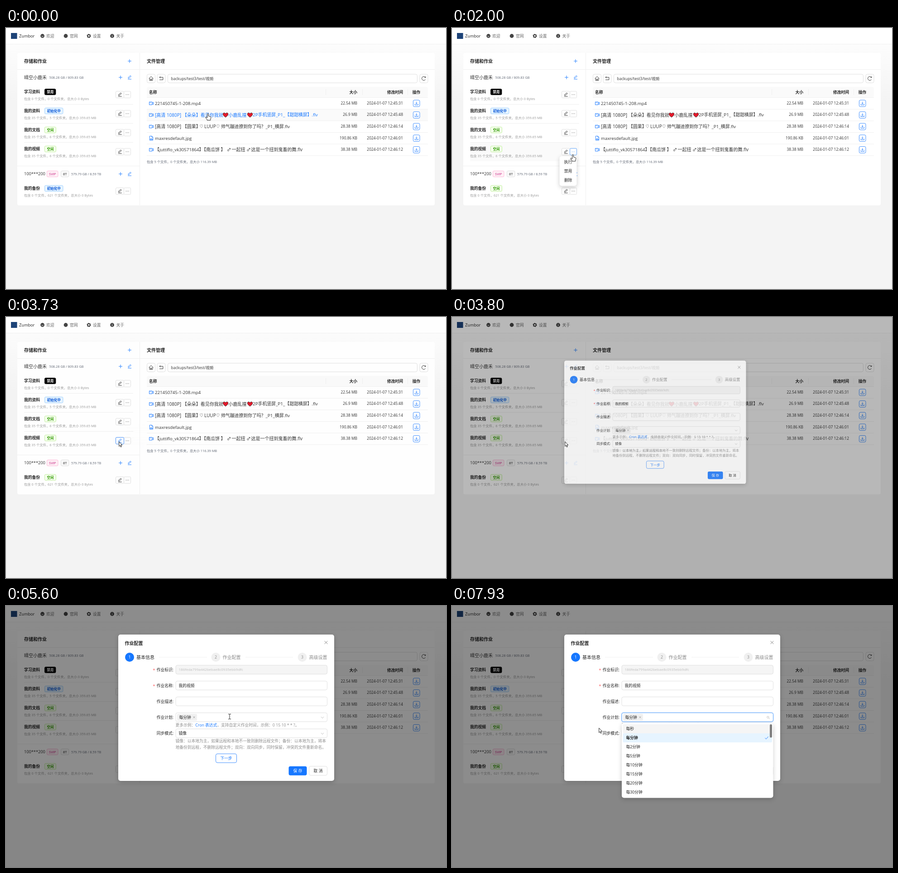
An HTML page for the animation above (8 s loop, 972x576 px).

```html
<!DOCTYPE html>
<html lang="zh-CN">
<head>
<meta charset="utf-8">
<style>
html, body { margin: 0; width: 100%; height: 100%; overflow: hidden; background: #f5f5f5; }
svg { display: block; }
text { font-family: 'Open Sans', 'Noto Sans CJK SC', 'Noto Sans CJK', 'Noto Sans', sans-serif; white-space: pre; }
.pop { filter: drop-shadow(0 3px 5px rgba(0,0,0,.2)); }
</style>
</head>
<body>
<svg id="stage" width="972" height="576" viewBox="0 0 972 576"></svg>
<script>
const BLUE = '#1677ff', INK = '#222', MUTED = '#999', SLATE = '#626976', LINE = '#f0f0f0', EDGE = '#d9d9d9';

// y is the middle of the line of text
const text = (x, y, s, size = 8.75, fill = INK, weight = 400, anchor = 'start') =>
  `<text x="${x}" y="${y + size * .36}" font-size="${size}" fill="${fill}" font-weight="${weight}" text-anchor="${anchor}">${s}</text>`;
const rect = (x, y, w, h, r = 0, fill = '#fff', stroke = 'none', extra = '') =>
  `<rect x="${x}" y="${y}" width="${w}" height="${h}" rx="${r}" fill="${fill}" stroke="${stroke}" stroke-width=".8" ${extra}/>`;
const line = (x1, y1, x2, y2) => `<path d="M${x1} ${y1}L${x2} ${y2}" stroke="${LINE}"/>`;
const disc = (x, y, r, fill) => `<circle cx="${x}" cy="${y}" r="${r}" fill="${fill}"/>`;
const group = (id, body, extra = '') => `<g id="${id}" ${extra}>${body}</g>`;

const ICONS = {
  plus: 'M-4 0H4M0-4V4',
  edit: 'M-3.8 4H4M-3 1.8V.2L1.8-4 3.4-2.4-1.4 1.8Z',
  dots: 'M-3.4 0h1M-.5 0h1M2.4 0h1',
  home: 'M-4.7.4 0-4.4 4.7.4M-3.4-.8V4.3H3.4V-.8M-1 4.3V1.4H1V4.3',
  back: 'M-4 3H3.8V-2.4H-3.8M-1.8-4.4-4-2.4-1.8-.4',
  reload: 'M3.6 2.2A4.3 4.3 0 1 1 3.5-2.4M3.9-4.4V-1.9H1.4',
  video: 'M-4.5-3.2H1.8V3.2H-4.5ZM1.8-1.1 4.7-2.4V2.4L1.8 1.1M-2.9-1.4H-1',
  image: 'M-3.6-4.6H1.2L3.6-2.2V4.6H-3.6ZM1-4.4V-2H3.4M-2.3 3-.6.4.6 2 1.5 1 2.5 3Z',
  load: 'M-3.7 1.6V3.6H3.7V1.6M0-3.6V1.3M-1.9-.5 0 1.4 1.9-.5',
  close: 'M-3.4-3.4 3.4 3.4M3.4-3.4-3.4 3.4',
  small: 'M-2-2 2 2M2-2-2 2',
  down: 'M-3-1.6 0 1.8 3-1.6',
  search: 'M1-.6A2.1 2.1 0 1 1-3.2-.6 2.1 2.1 0 0 1 1-.6M.5 1 3 3.2',
  check: 'M-3.6.2-1 2.6 3.6-2.8'
};
const icon = (name, x, y, color = INK, width = .9) =>
  `<path transform="translate(${x} ${y})" d="${ICONS[name]}" fill="none" stroke="${color}" stroke-width="${width}"/>`;
const heart = (x, y) =>
  `<path transform="translate(${x} ${y})" d="M0 5.2C-3 3-5.7.8-5.7-1.8-5.7-5.3-1.4-5.6 0-2.6 1.4-5.6 5.7-5.3 5.7-1.8 5.7.8 3 3 0 5.2Z" fill="#e6192b" stroke="#222" stroke-width=".8"/>`;

function tag(x, y, s, w, [fill, edge, ink], weight = 600) {
  return rect(x + .4, y - 6.6, w, 13.2, 2.5, fill, edge) + text(x + .4 + w / 2, y, s, 7.5, ink, weight, 'middle');
}
const OFF = ['#000', '#000', '#fff'], BUSY = ['#e6f4ff', '#91caff', '#0958d9'], IDLE = ['#f6ffed', '#b7eb8f', '#389e0d'];
const busyTag = y => tag(85, y, '初始化中', 40.5, BUSY);
const idleTag = y => tag(85, y, '空闲', 25, IDLE);

const editBox = (y, c = EDGE, ink = INK) => rect(242.5, y - 7.3, 18, 14.6, 2, '#fff', c) + icon('edit', 251.7, y, ink);
const moreBox = (y, c = EDGE, ink = INK) => rect(260.5, y - 7.3, 15, 14.6, 2, '#fff', c) + icon('dots', 268, y, ink);

const summary = (n, dirs, size) => `包含 ${n} 个文件，${dirs} 个文件夹，总大小 ${size}`;
function job(y, name, badge, info) {
  return text(40, y, name, 8.75, INK, 600) + badge + text(40, y + 15, info, 7.35, MUTED) +
    moreBox(y + 6) + editBox(y + 6);
}
const drive = y => icon('plus', 253, y, BLUE) + icon('edit', 273, y, BLUE);

function header() {
  const items = ['欢迎', '官网', '设置', '关于'].map((s, i) => text([89, 141, 192, 243.5][i], 17.5, s, 8.75, '#666')).join('');
  return rect(0, 0, 972, 35.5) + line(0, 35.5, 972, 35.5) +
    rect(11, 11, 13.5, 13, 0, '#1d4378') + text(29, 17.5, 'Zumbor', 9.2, INK, 500) + items +
    disc(80.5, 17.5, 4.4, '#444') + '<path d="M78.3 17.5 80.5 19.3 82.7 17.5" stroke="#fff" fill="none"/>' +
    disc(132, 17.5, 4.4, '#444') +
    '<circle cx="183" cy="17.5" r="2.8" fill="none" stroke="#444" stroke-width="2"/><circle cx="183" cy="17.5" r="4" fill="none" stroke="#444" stroke-width="1.2" stroke-dasharray="2.1"/>' +
    disc(234.5, 17.5, 4.4, '#444') + '<path d="M234.5 16.8V20M234.5 14.8V15.8" stroke="#fff"/>';
}

function sidebar() {
  return text(40, 73, '存储和作业', 10, INK, 600) + icon('plus', 273, 73, BLUE) + line(25, 91.5, 947, 91.5) +
    text(40, 109, '晴空小鹿禾', 10, '#333') + text(95.5, 109, '508.28 GB / 809.83 GB', 7.3, SLATE, 500) + drive(109) +
    group('jobHover', rect(40, 253, 241, 41, 0, '#fafafa')) +
    [168.5, 210.5, 252.5].map(y => line(40, y, 281, y)).join('') + line(25, 304.5, 295, 304.5) +
    job(141, '学习资料', tag(85, 141, '禁用', 24.5, OFF), summary(0, 0, '0 Bytes')) +
    job(183, '我的资料', busyTag(183), summary(35, 5, '359.65 MB')) +
    job(225, '我的文档', idleTag(225), summary(35, 6, '359.65 MB')) +
    job(267, '我的视频', idleTag(267), summary(35, 6, '359.65 MB')) +
    group('moreOn', moreBox(273, '#4096ff', '#4096ff')) + group('editOn', editBox(273, BLUE, BLUE)) +
    text(40, 322, '100***200', 9.2, '#333') +
    tag(90, 322, 'SVIP', 24.5, ['#fff0f6', '#ffadd2', '#c41d7f'], 400) + tag(121, 322, '8T', 17.5, ['#fafafa', EDGE, INK], 400) +
    text(144, 322, '579.79 GB / 8.59 TB', 7.3, SLATE, 500) + drive(322) +
    job(354, '我的备份', group('busy', busyTag(354)) + group('idle', idleTag(354)), summary(0, 621, '0 Bytes'));
}

const rowY = i => 166.3 + 25.6 * i;
function fileRow(i, parts, size, time) {
  const y = rowY(i);
  const name = parts.map(([x, s, em = 10]) => s ? text(x, y, s, em, 'currentColor') : heart(x, y)).join('');
  return line(311, y + 13, 932, y + 13) + icon(i == 3 ? 'image' : 'video', 321, y, BLUE) + group('file' + i, name, 'color="#333"') +
    text(776, y - .5, size, 8.4, '#333', 400, 'end') + text(877, y - .5, time, 8.45, '#333', 400, 'end') +
    rect(899.5, y - 7.2, 14.5, 14.5, 2.8, '#fff', BLUE) + icon('load', 906.8, y, BLUE);
}

function files() {
  const at = s => '2024-01-07 12:4' + s;
  return text(311, 73, '文件管理', 10, INK, 600) +
    [311.5, 334, 914].map((x, i) => rect(x, 102, 18, 19, 3.5, '#fff', EDGE) + icon(['home', 'back', 'reload'][i], x + 9, 111.3)).join('') +
    rect(357.5, 102, 551, 19, 3.5, '#fff', EDGE) + text(364.5, 111.5, 'backups/test3/test/视频', 8.5, '#333') +
    rect(311, 130, 621, 23.5, 4, '#fafafa') + [706.5, 787.5, 887.5].map(x => line(x, 135, x, 148)).join('') + line(311, 153.5, 932, 153.5) +
    text(316, 141.5, '名称', 8.75, INK, 600) + text(776, 141.5, '大小', 8.75, INK, 600, 'end') +
    text(877, 141.5, '修改时间', 8.75, INK, 600, 'end') + text(906.5, 141.5, '操作', 8.75, INK, 600, 'middle') +
    group('fileHover', rect(311, 154, 621, 25, 0, '#fafafa')) +
    fileRow(0, [[329, '221450745-1-208.mp4', 9.7]], '22.54 MB', at('5:31')) +
    fileRow(1, [[329, '[高清 1080P] 【朵朵】看见你我就'], [485], [491.5, '小鹿乱撞'], [539], [545, '2P手机竖屏_P1_【甜甜横屏】.flv', 9.85]], '26.9 MB', at('5:48')) +
    fileRow(2, [[329, '[高清 1080P] 【圆果】'], [428, '♡', 7.5], [438, 'LUUP'], [464.5, '♡', 7.5], [475, '帅气蹦迪撩到你了吗？_P1_横屏.flv', 9.85]], '28.38 MB', at('6:14')) +
    fileRow(3, [[329, 'maxresdefault.jpg', 9.7]], '190.86 KB', at('6:01')) +
    fileRow(4, [[329, '【juttiflo_vk30571864】', 9.7], [432, '【南瓜饼 】'], [488, '♂', 9], [498.5, '一起扭'], [531.5, '♂', 9], [541.5, '这是一个扭到鬼畜的舞.flv']], '38.38 MB', at('6:12')) +
    text(311, 295, summary(5, 0, '116.39 MB'), 7.35, SLATE);
}

function menu() {
  return rect(237.5, 283, 38, 65.5, 5, '#fff', 'none', 'class="pop"') +
    ['执行', '禁用', '删除'].map((s, i) => text(256.5, 296 + 20 * i, s, 8.75, INK, 400, 'middle')).join('');
}

function modal() {
  const gray = '#8c8c8c';
  const step = (x, n, s) => disc(x, 113, 10, n == 1 ? BLUE : '#f0f0f0') +
    text(x, 113, n, 8.75, n == 1 ? '#fff' : gray, 400, 'middle') + text(x + 15, 113, s, 10, n == 1 ? INK : gray);
  const field = (y, label, fill = '#fff', must) => text(370, y, label + ':', 8.75, INK, 400, 'end') +
    (must ? text(324.5, y + 1, '*', 8.75, '#ff4d4f') : '') + rect(375, y - 9.8, 334.5, 19.6, 3.6, fill, EDGE);
  return rect(248, 63, 477, 323, 5, '#fff', 'none', 'class="pop"') +
    text(262.5, 82.5, '作业配置', 10, INK, 600) + icon('close', 707, 80.5, '#777') +
    step(273, 1, '基本信息') + line(338, 113, 444, 113) + step(463.5, 2, '作业配置') + line(529, 113, 634, 113) + step(654.5, 3, '高级设置') +
    field(140.5, '作业标识', '#f5f5f5', 1) + text(381.5, 140.5, '186feda799a442bebae8c0935ebb9dfc', 8, '#bfbfbf') +
    field(175.5, '作业名称', '#fff', 1) + text(381.5, 175.5, '我的视频') +
    field(210.5, '作业描述') + field(245.5, '作业计划') +
    group('focus', rect(375, 235.7, 334.5, 19.6, 3.6, '#fff', '#4096ff', 'style="filter:drop-shadow(0 0 1px #4096ff80)"')) +
    rect(378, 238, 44, 15, 2.5, '#f0f0f0') + text(382.5, 245.5, '每分钟') + icon('small', 415.5, 245.5, '#777', .7) +
    group('caret', '<path d="M424.5 240V252" stroke="#222" stroke-width=".8"/>') +
    group('arrow', icon('down', 699, 246, '#bbb')) + group('lens', icon('search', 699, 246, '#bbb')) +
    text(374.5, 263, `更多示例：<tspan fill="${BLUE}">Cron 表达式</tspan>，支持自定义作业时间，示例：0 15 10 * * ?。`, 8.75, gray) +
    field(281, '同步模式') + text(381.5, 281, '镜像') + icon('down', 699, 281.5, '#bbb') +
    text(374.5, 298, '镜像：以本地为主，如果远程和本地不一致则删除远程文件；备份：以本地为主，将本', 8.75, gray) +
    text(374.5, 311.7, '地备份到远程，不删除远程文件；双向：双向同步，同时保留，冲突的文件重新命名。', 8.75, gray) +
    rect(463.5, 326.2, 46, 19.6, 3.6, '#fff', BLUE) + text(486.5, 336, '下一步', 8.75, BLUE, 400, 'middle') +
    rect(624.5, 353.7, 40, 20, 3.6, BLUE) + text(644.5, 363.7, '保 存', 8.75, '#fff', 500, 'middle') +
    rect(669.5, 353.7, 40, 20, 3.6, '#fff', EDGE) + text(689.5, 363.7, '取 消', 8.75, INK, 400, 'middle');
}

function options() {
  const names = ['秒', '分钟', ...[2, 5, 10, 15, 20, 30].map(n => n + '分钟')];
  return rect(375, 258, 334.5, 165.5, 5, '#fff', 'none', 'class="pop"') +
    group('optHover', rect(377.5, 261, 329.5, 20, 2.5, '#f5f5f5')) + rect(377.5, 281, 329.5, 20, 2.5, '#e6f4ff') +
    names.map((s, i) => text(384.5, 271 + 20 * i, '每' + s, 8.75, INK, i == 1 ? 600 : 400)).join('') +
    icon('check', 695, 291, BLUE) + group('bar', rect(702, 261, 5, 29.5, 2.5, '#7f7f7f'));
}

const CURSORS = {
  hand: 'M-1.3 1.2Q0-.8 1.3 1.2V5.8L5.2 6.7Q7.1 7.2 6.8 9.2L5.8 13V15H-1.8V13.4L-4.9 9.6Q-5.4 8-4 8L-1.3 9.6Z',
  arrow: 'M0 0V10.2L2.3 8.1 3.9 11.8 5.5 11.1 3.9 7.5H7.1Z',
  beam: 'M-3-5.5H-1L0-4.8 1-5.5H3M-3 5.5H-1L0 4.8 1 5.5H3M0-4.8V4.8'
};

stage.innerHTML =
  '<defs><linearGradient id="bg" x2="0" y2="1"><stop stop-color="#fff"/><stop offset=".28" stop-color="#f4f4f4"/></linearGradient></defs>' +
  rect(0, 0, 972, 576, 0, 'url(#bg)') + header() + rect(25, 55, 922, 336.5, 4) + line(295.5, 55, 295.5, 391) +
  sidebar() + files() + group('menu', menu()) + group('mask', rect(0, 0, 972, 576, 0, '#000')) +
  group('modal', modal()) + group('options', options()) +
  group('pointer', Object.keys(CURSORS).map(k =>
    `<path id="${k}Cursor" d="${CURSORS[k]}" fill="${k == 'beam' ? 'none' : '#fff'}" stroke="#111" stroke-width=".9"/>`).join(''));

const $ = id => document.getElementById(id);
const show = (id, on) => $(id).style.display = on ? '' : 'none';
const clamp = v => Math.max(0, Math.min(1, v));
const ramp = (t, from, to) => clamp((t - from) / (to - from));

// time, x, y, shape
const PATH = [
  [0, 446, 188.5, 'hand'], [70, 446, 188.5, 'hand'], [400, 486, 187, 'arrow'], [870, 534, 193, 'arrow'], [930, 534, 193, 'arrow'],
  [1600, 268, 278, 'hand'], [1670, 267, 279, 'hand'], [2529, 267, 279, 'hand'], [2530, 266, 279, 'hand'], [2670, 266, 279, 'hand'],
  [3070, 249.7, 275.2, 'hand'], [3640, 249.7, 275.2, 'arrow'], [4470, 249.7, 275.2, 'arrow'], [4930, 415, 293, 'arrow'],
  [5270, 415, 293, 'arrow'], [5460, 460, 264, 'beam'], [5600, 494, 244, 'beam'], [6800, 494, 244, 'beam'],
  [6900, 498, 256, 'hand'], [7200, 512, 287, 'hand'], [7670, 512, 287, 'hand'], [7840, 374, 275, 'arrow'],
  [7930, 324.7, 269.2, 'arrow'], [8000, 324.7, 269.2, 'arrow']
];
function pointerAt(t) {
  const i = PATH.findIndex((p, n) => t < PATH[n + 1][0]);
  const [t0, x0, y0, shape] = PATH[i], [t1, x1, y1] = PATH[i + 1];
  const p = (t - t0) / (t1 - t0);
  return { x: x0 + (x1 - x0) * p, y: y0 + (y1 - y0) * p, shape };
}

// Scales from a fixed line while fading
function unfold(id, p, top) {
  show(id, p > 0);
  $(id).setAttribute('opacity', p);
  $(id).setAttribute('transform', `translate(0 ${top}) scale(1 ${.8 + .2 * p}) translate(0 ${-top})`);
}

function draw(t) {
  const { x, y, shape } = pointerAt(t);
  $('pointer').setAttribute('transform', `translate(${x} ${y})`);
  for (const k in CURSORS) show(k + 'Cursor', k == shape);

  const row = Math.floor((y - 153.5) / 25.6), free = t < 3730;
  show('fileHover', free && x > 311 && row >= 0 && row < 5);
  $('fileHover').setAttribute('transform', `translate(0 ${row * 25.6})`);
  $('file1').setAttribute('color', t < 400 ? BLUE : '#333');
  show('jobHover', free && x < 281 && y > 253);
  show('busy', t < 470);
  show('idle', t >= 470);
  show('moreOn', t > 1600 && t < 2800);
  show('editOn', t > 3000 && t < 3780);
  unfold('menu', t < 2600 ? 1 - (1 - ramp(t, 1800, 2000)) ** 4 : 1 - ramp(t, 2670, 2870), 283);

  const zoom = 1 - (1 - ramp(t, 3730, 4030)) ** 6;
  $('mask').setAttribute('opacity', .45 * ramp(t, 3730, 3845));
  show('modal', zoom > 0);
  $('modal').setAttribute('opacity', zoom);
  $('modal').setAttribute('transform', `translate(248 273) scale(${.2 + .8 * zoom}) translate(-248 -273)`);

  show('focus', t > 5670);
  $('focus').setAttribute('opacity', ramp(t, 5670, 5850));
  show('caret', t > 5900 && t < 6470 || t >= 6970 && t < 7470);
  show('arrow', t < 5870);
  show('lens', t >= 5870);
  unfold('options', 1 - (1 - ramp(t, 5850, 6060)) ** 4, 258);
  show('optHover', t > 6940 && t < 7140 || t > 7760);
  show('bar', t > 6900);
}

function tick(now) {
  draw(now % 8000);
  requestAnimationFrame(tick);
}
requestAnimationFrame(tick);
</script>
</body>
</html>
```
